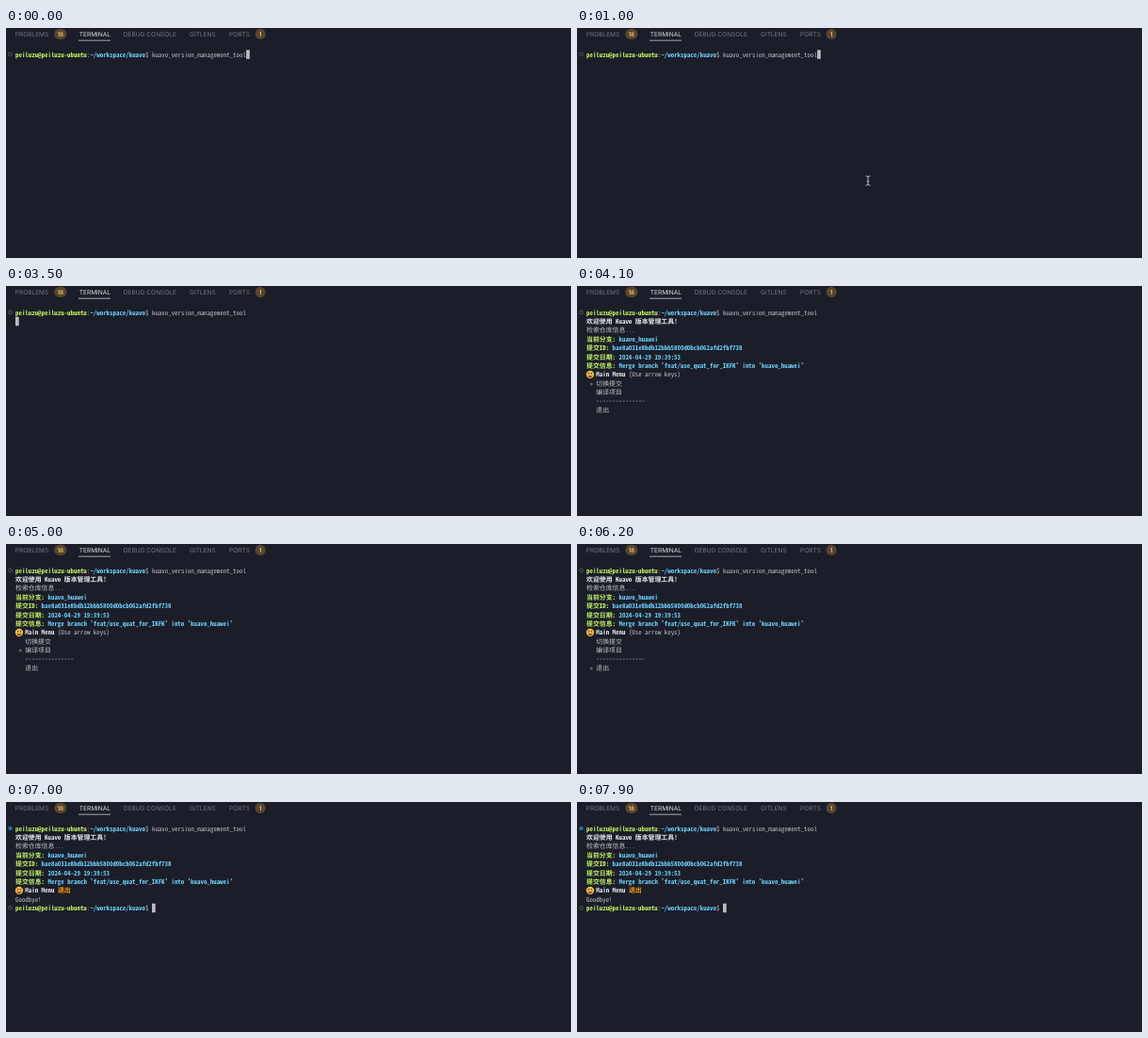
Recreate the animation shown at these times as an HTML page. Size 600 by 244 pixels, loop 8000 ms.

```html
<!DOCTYPE html>
<html lang="zh-CN">
<head>
<meta charset="utf-8">
<title>Terminal</title>
<style>
html, body { margin: 0; width: 100%; height: 100%; overflow: hidden; background: #1b1e28; }
svg { display: block; width: 600px; height: 244px; }
text { white-space: pre; text-rendering: geometricPrecision; font-variant-ligatures: none; }
.tab { font: 6.55px Inter, Roboto, sans-serif; fill: #747780; }
.badge { font: 600 6.4px Inter, Roboto, sans-serif; fill: #f3c065; text-anchor: middle; }
</style>
</head>
<body>
<svg id="stage" viewBox="0 0 600 244" xmlns="http://www.w3.org/2000/svg">
  <rect width="600" height="244" fill="#1b1e28"/>
  <g class="tab">
    <text x="9.8" y="8.9">PROBLEMS</text>
    <text x="77.8" y="8.9" fill="#dcdde1">TERMINAL</text>
    <text x="124.8" y="8.9">DEBUG CONSOLE</text>
    <text x="195" y="8.9">GITLENS</text>
    <text x="237" y="8.9">PORTS</text>
  </g>
  <path d="M77 13.2H111" stroke="#c9cbd0" stroke-width=".8"/>
  <rect x="51.2" y=".8" width="13.2" height="11.2" rx="5.6" fill="#57452f"/>
  <rect x="264.6" y=".8" width="11" height="11.2" rx="5.5" fill="#57452f"/>
  <g class="badge">
    <text x="57.8" y="8.7">18</text>
    <text x="270.1" y="8.7">1</text>
  </g>
  <g id="screen"></g>
  <g id="mouse" fill="none" stroke-linecap="round">
    <path id="beam" d="M-2-5Q0-5 0-3.6Q0-5 2-5M0-3.6V3.6M-2 5Q0 5 0 3.6Q0 5 2 5M-1 .8H1" stroke="#c3c5ca" stroke-width=".9"/>
  </g>
</svg>
<script>
const LOOP = 8000, CELL = 3.452, LEFT = 10, TOP = 28.2, ROW = 9.38;
const GREEN = '#c6f567', BLUE = '#6fcfff', WHITE = '#e9eaed', GRAY = '#c1c4c9', ORANGE = '#ff9d0a';
const LATIN = '"Noto Sans Mono CJK SC", "Noto Sans Mono", monospace';
const HAN = '"Noto Sans Mono CJK SC", "Noto Sans CJK SC", sans-serif';
const screen = document.getElementById('screen');
const mouse = document.getElementById('mouse');

// Font size at which one Latin character fills one cell
const pen = document.createElement('canvas').getContext('2d');
pen.font = '100px ' + LATIN;
const latinSize = CELL * 100 / pen.measureText('0').width;
const hanSize = CELL * 2;

function add(tag, attrs, content) {
  const el = document.createElementNS('http://www.w3.org/2000/svg', tag);
  for (const k in attrs) el.setAttribute(k, attrs[k]);
  if (content) el.textContent = content;
  screen.appendChild(el);
}

const colX = col => LEFT + col * CELL;
const rowY = row => TOP + row * ROW;

// Each span is [text, colour, bold]; Han characters take two cells
function line(row, spans, col = 0) {
  for (const [str, fill, bold] of spans) {
    for (const run of str.match(/[\u4e00-\u9fff]+|[^\u4e00-\u9fff]+/g)) {
      const han = /[\u4e00-\u9fff]/.test(run);
      add('text', {
        x: colX(col), y: rowY(row) + 2.4, fill,
        'font-family': han ? HAN : LATIN,
        'font-size': han ? hanSize : latinSize,
        'font-weight': bold ? 700 : 400
      }, run);
      col += run.length * (han ? 2 : 1);
    }
  }
}

function prompt(row) {
  line(row, [
    ['peiluzu@peiluzu-ubuntu', GREEN, true], [':', WHITE],
    ['~/workspace/kuavo', BLUE, true], ['$ ', GRAY]
  ]);
}

function caret(row, col) {
  add('rect', { x: colX(col), y: rowY(row) - 4.9, width: 3.7, height: 9.5, fill: '#b9bcc1' });
}

function mark(row, done) {
  add('circle', {
    cx: 4.5, cy: rowY(row) - .3, r: done ? 2.2 : 1.9,
    fill: done ? '#21789c' : 'none', stroke: done ? 'none' : '#5b626d', 'stroke-width': .8
  });
}

function smiley(row) {
  const y = rowY(row);
  add('circle', { cx: 14, cy: y, r: 4.2, fill: '#f7bd3a' });
  add('ellipse', { cx: 12.6, cy: y - 1.2, rx: .6, ry: .9, fill: '#503214' });
  add('ellipse', { cx: 15.4, cy: y - 1.2, rx: .6, ry: .9, fill: '#503214' });
  add('path', { d: `M11.4 ${y + .7}H16.6Q16.2 ${y + 3.2} 14 ${y + 3.2}T11.4 ${y + .7}`, fill: '#6a3416' });
  add('path', { d: `M11.9 ${y + 1}H16.1`, stroke: '#fff', 'stroke-width': .7 });
}

const info = [
  ['当前分支: ', 'kuavo_huawei'],
  ['提交ID: ', 'bae8a031e8bdb12bbb5800d0bcb062afd2fbf738'],
  ['提交日期: ', '2024-04-29 19:39:53'],
  ['提交信息: ', "Merge branch 'feat/use_quat_for_IKFK' into 'kuavo_huawei'"]
];
const choices = ['切换提交', '编译项目', '-'.repeat(15), '退出'];

const steps = [
  [0, 'typed'], [1200, 'wait'], [3600, 'search'], [3700, 'info'], [3800, 'pick0'],
  [4700, 'pick1'], [5400, 'pick3'], [6600, 'bye'], [6800, 'done']
];

function draw(stage) {
  screen.textContent = '';
  mark(0, stage === 'done');
  prompt(0);
  line(0, [['kuavo_version_management_tool', GRAY]], 42);
  if (stage === 'typed') return caret(0, 71);
  if (stage === 'wait') return caret(1, 0);

  line(1, [['欢迎使用 Kuavo 版本管理工具!', WHITE, true]]);
  line(2, [['检索仓库信息...', GRAY]]);
  if (stage === 'search') return caret(3, 0);

  info.forEach(([label, value], i) => line(3 + i, [[label, GREEN, true], [value, BLUE, true]]));
  if (stage === 'info') return caret(7, 0);

  smiley(7);
  line(7, [['Main Menu ', WHITE, true]], 3);
  if (stage.startsWith('pick')) {
    line(7, [['(Use arrow keys)', GRAY]], 13);
    choices.forEach((name, i) => line(8 + i, [[name, GRAY]], 3));
    return line(8 + Number(stage[4]), [['»', GRAY]], 1);
  }

  line(7, [['退出', ORANGE, true]], 13);
  line(8, [['Goodbye!', GRAY]]);
  if (stage === 'bye') return caret(9, 0);
  mark(9, false);
  prompt(9);
  caret(9, 42);
}

let shown = '';
function update(t) {
  const stage = steps.filter(s => s[0] <= t).pop()[1];
  if (stage !== shown) draw(shown = stage);

  const p = Math.min(1, Math.max(0, (t - 100) / 500));
  const left = (1 - p) ** 2;
  mouse.setAttribute('transform', `translate(${309 - 3 * left} ${162 + 31 * left})`);
  mouse.setAttribute('visibility', t >= 100 && t < 1200 ? 'visible' : 'hidden');
}

function tick() {
  update(performance.now() % LOOP);
  requestAnimationFrame(tick);
}
tick();
</script>
</body>
</html>
```
